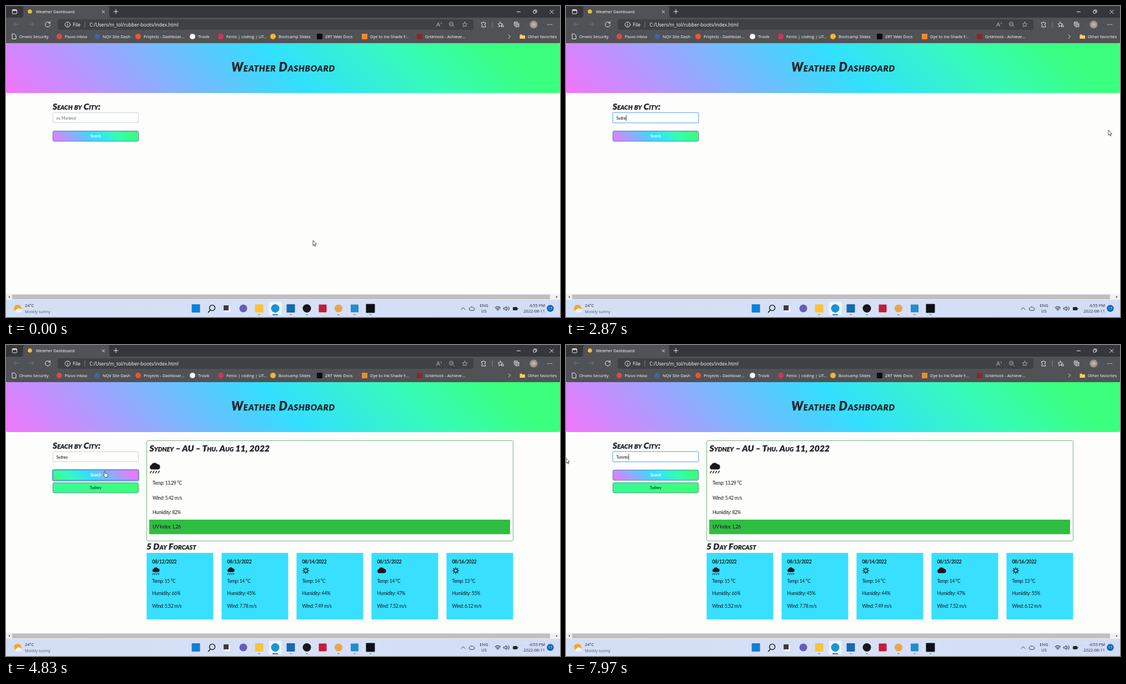
An HTML page for the animation above (8 s loop, 998 px wide and 561 px high).

```html
<!DOCTYPE html>
<html lang="en">
<head>
<meta charset="utf-8">
<title>Weather Dashboard</title>
<style>
html, body { margin: 0; width: 100%; height: 100%; overflow: hidden; background: #fdfdfb; }
svg { display: block; width: 100vw; height: 100vh; }
text { font: 7.45px "Open Sans", "Noto Sans", sans-serif; fill: #fff; white-space: pre; }
text.url { font-size: 8.55px; }
text.dark { fill: #25262c; }
text.mid { text-anchor: middle; }
text.end { text-anchor: end; }
text.head { font: italic 900 15.7px Lato, sans-serif; font-variant: small-caps; fill: #212529; stroke: #212529; stroke-width: .25; }
text.title { font-size: 21.6px; letter-spacing: .8px; text-anchor: middle; }
text.body { font: 8.5px Lato, sans-serif; letter-spacing: -.35px; fill: #14181b; }
text.small { font-size: 7.1px; }
text.bold { font-weight: 700; }
text.white { fill: #fff; }
text.hint { fill: #6c757d; }
.line { fill: none; stroke: #fff; stroke-width: .9; stroke-linecap: round; stroke-linejoin: round; }
.dim { stroke: #7b7c80; }
.soft { stroke: #b9b9c0; }
.ink { stroke: #222; }
.pointer > * { stroke-linejoin: round; }
</style>
</head>
<body>
<svg viewBox="0 0 998 561" preserveAspectRatio="none">
  <defs>
    <linearGradient id="rainbow">
      <stop offset="0" stop-color="#f375fb"/>
      <stop offset=".5" stop-color="#32dfff"/>
      <stop offset=".73" stop-color="#36fcb7"/>
      <stop offset=".89" stop-color="#3aff80"/>
      <stop offset="1" stop-color="#3cff7a"/>
    </linearGradient>
    <linearGradient id="banner" href="#rainbow" gradientUnits="userSpaceOnUse" x1="227" y1="383" x2="771" y2="-160"/>
    <linearGradient id="button" href="#rainbow" gradientUnits="userSpaceOnUse" x1="118.5" y1="278" x2="204.5" y2="192"/>
    <linearGradient id="hover" href="#rainbow" gradientUnits="userSpaceOnUse" x1="192.5" y1="192" x2="106.5" y2="278"/>
    <linearGradient id="past">
      <stop stop-color="#36fa98"/><stop offset="1" stop-color="#3cff78"/>
    </linearGradient>
    <linearGradient id="taskbar">
      <stop stop-color="#d2dff5"/><stop offset=".5" stop-color="#d6e0f7"/><stop offset="1" stop-color="#d2dcf6"/>
    </linearGradient>
    <radialGradient id="avatar">
      <stop stop-color="#c9bdb2"/><stop offset="1" stop-color="#8d8580"/>
    </radialGradient>
    <g id="cloud"><path d="M4.3 13a4.2 4.2 0 0 1-.6-8.2A5.8 5.2 0 0 1 14.4 3.600A4.8 4.8 0 0 1 15.600 13z"/></g>
    <g id="rain">
      <use href="#cloud"/>
      <path d="M3.500 15.300L1 20M8.300 15.300L5.800 20M13.100 15.300L10.600 20M17.900 15.300L15.400 20" fill="none" stroke="currentColor" stroke-width="1.5"/>
    </g>
    <g id="sun" fill="none" stroke="currentColor" stroke-width="2">
      <circle cx="10" cy="10" r="4.700"/>
      <path id="ray" d="M10 .5V4M10 16V19.500M.5 10H4M16 10H19.500"/>
      <use href="#ray" transform="rotate(45 10 10)"/>
    </g>
  </defs>

  <!-- page -->
  <rect width="998" height="561" fill="#fdfdfb"/>
  <rect y="67" width="998" height="90" rx="2" fill="url(#banner)"/>

  <!-- search form -->
  <rect id="inputGlow" x="83.200" y="191.200" width="156.600" height="20.600" rx="3" fill="#b9d6fe"/>
  <rect id="input" x="84.500" y="192.500" width="154" height="18" rx="2" fill="#fdfdfb" stroke="#ced4da"/>
  <rect id="selection" x="90.500" y="196.500" height="11" fill="#3a84ea"/>
  <text id="value" class="body small" x="90.800" y="204.700"></text>
  <path id="caret" d="M0 196.500V207.500" stroke="#222" stroke-width=".8"/>
  <rect id="buttonGlow" x="82.800" y="223.800" width="157.400" height="22.400" rx="3.500" fill="#8db4fa"/>
  <rect id="search" x="84.500" y="225.500" width="154" height="18.500" rx="2" stroke="#4377bd" stroke-width=".9"/>
  <g id="results">
    <rect x="84.500" y="248.500" width="154" height="18" rx="2" fill="url(#past)" stroke="#38a164" stroke-width=".9"/>
    <rect x="253.500" y="172.500" width="660" height="181" rx="2" fill="none" stroke="#6bab7c" stroke-width=".9"/>
    <rect x="258" y="315" width="650" height="26.300" fill="#2fbe42"/>
    <use href="#rain" transform="translate(258.500 211.500)" fill="#17191c" color="#17191c"/>
  </g>
  <g id="labels"></g>

  <!-- browser frame -->
  <rect width="998" height="67" fill="#515256"/>
  <path d="M0 0H998V21H190Q186 21 186 17V4Q186 0 182 0H35Q31 0 31 4V17Q31 21 27 21H0z" fill="#36373b"/>
  <rect x="93" y="24" width="749" height="19" rx="3" fill="#404145"/>
  <circle cx="43" cy="10" r="3.800" fill="#efc03a"/>
  <g class="line">
    <rect x="11.500" y="6.500" width="8" height="7.500" rx="1.200"/><path d="M12 8H19" stroke-width="1.500"/>
    <path d="M173.500 8.500l4 4m0-4l-4 4M194 10h8m-4-4v8M920.500 10.500h6M980 7.500l6 6m0-6l-6 6"/>
    <rect x="950" y="8.500" width="4.500" height="4.500" rx=".8"/><path d="M951.500 7h3.500q1 0 1 1v3.500"/>
    <path class="dim" d="M23 33H14m4-4l-4 4l4 4M41 33h9m-4-4l4 4l-4 4"/>
    <path d="M79 30.500a4.600 4.600 0 1 0 .8 3.500M79.500 28v3h-3"/>
    <circle cx="111" cy="33.500" r="4.600"/><path d="M111 33v3M111 31v.1"/>
    <path class="soft" d="M142 28.500V38.500M876 28.500V38.500" stroke-width=".5"/>
    <g class="soft">
      <path d="M775.500 37l3-7.500l3 7.500m-1-2.500h-4M783 30l1.500 1v1.500"/>
      <circle cx="802" cy="32.500" r="3.500"/><path d="M804.500 35l3 3M800.500 32.500h3"/>
      <path id="star" d="M826.500 29l1.300 2.800l3 .4l-2.200 2.200l.5 3l-2.600-1.500l-2.700 1.500l.6-3l-2.200-2.200l3-.4z"/>
    </g>
    <path d="M857 30h2q1-3 2.500 0h2v2.500q-3 1 0 2.800v2.500h-6.500v-2.500q2.500-1.500 0-2.800z"/>
    <use href="#star" x="64"/><path d="M893 35h3.500m-2.500 2.500h2.500"/>
    <rect x="915.500" y="29" width="6.500" height="6.500" rx="1"/><path d="M924 31.500v5q0 1-1 1h-5M917 32.300h3.500m-1.750-1.800v3.500"/>
    <path d="M976.500 33.500h.1M979.800 33.500h.1M983 33.500h.1" stroke-width="1.500"/>
    <path d="M11.500 50.500h4l2.500 2.500v6.500h-6.500zM905.500 52l3 3l-3 3"/>
  </g>
  <circle cx="950.500" cy="33.500" r="7.200" fill="url(#avatar)"/>
  <path d="M925.500 51.500h3.500l1 1.500h5v6h-9.500z" fill="#f5cf62"/>

  <!-- scrollbar and taskbar -->
  <rect y="519.500" width="998" height="10.500" fill="#f1f1f1"/>
  <rect x="11" y="520.500" width="969" height="8.500" fill="#bfbfc1"/>
  <path d="M7 522.500v4.500l-2.500-2.200zM991 522.500v4.500l2.500-2.200z" fill="#555"/>
  <rect y="530" width="998" height="31" fill="url(#taskbar)"/>
  <g transform="translate(21 545.500) scale(1.200)">
    <circle r="5.500" fill="#f7a51c"/><path d="M-2 6a2.200 2.200 0 0 1 .4-4.300a3.200 3.200 0 0 1 6-.2a2.300 2.300 0 0 1 .6 4.500z" fill="#eef3fc"/>
  </g>
  <rect x="473.500" y="533.500" width="23" height="24" rx="2.500" fill="#eef3fd"/>
  <g class="line ink">
    <circle cx="371.500" cy="544.500" r="5" stroke-width="1.500"/><path d="M368 548.500l-3.500 4" stroke-width="1.700"/>
    <path d="M820 547.500l3.500-3.500l3.500 3.500"/>
    <path d="M836 549a2.300 2.300 0 0 1 0-4.500a3.400 3.400 0 0 1 6 0a2.300 2.300 0 0 1 .5 4.500z"/>
    <path d="M881.500 544.500q4.500-4.500 9 0M883 546.500q3-3 6 0M884.500 548.300q1.500-1.500 3 0" stroke-width="1.100"/>
    <path d="M897 544.500h1.500l2.500-2.500v7.500l-2.500-2.500h-1.500zM903 543.500q1.700 2 0 4.500M905 542q3 3.700 0 7.500"/>
    <rect x="913.500" y="543.500" width="7.500" height="5" rx="1" fill="#222"/><path d="M922.300 545.500v1"/>
  </g>
  <rect x="395" y="543.500" width="9" height="9" fill="#f5f6fa"/><rect x="392" y="540" width="9" height="9" fill="#3a3b41"/>
  <circle cx="980.500" cy="545.500" r="6.200" fill="#0b66b8"/>
  <g id="icons"></g>
  <g id="chrome"></g>

  <!-- pointers, hot spot at the origin -->
  <g id="arrow" class="pointer"><path d="M0 0V9.300L2.200 7.300L3.600 10.500L5 9.900L3.600 6.800H6.500z" fill="#fff" stroke="#222" stroke-width=".8"/></g>
  <g id="hand" class="pointer"><path d="M-.9 7V1.100Q0-.3 1 1.100V4.600L4.600 5.300Q5.800 5.600 5.600 7L4.900 11.500H.6L-2.400 7.600Q-2.200 6-.9 7z" fill="#fff" stroke="#222" stroke-width=".8"/></g>
  <g id="beam" class="pointer"><path d="M-1.500-4.500H1.500M0-4.500V4.500M-1.500 4.500H1.500" fill="none" stroke="#222" stroke-width=".8"/></g>
</svg>
<script>
const byId = id => document.getElementById(id);
const make = (parent, tag, attrs, content = '') => {
  const el = document.createElementNS('http://www.w3.org/2000/svg', tag);
  for (const key in attrs) el.setAttribute(key, attrs[key]);
  el.textContent = content;
  return parent.appendChild(el);
};
const write = (parent, x, y, content, style = '') =>
  make(parent, 'text', { x, y, class: style }, content);
const mark = (x, y, size, fill, round) => make(byId('icons'), 'rect', {
  x: x - size / 2, y: y - size / 2, width: size, height: size, rx: round ? size / 2 : 1, fill
});

// Browser and taskbar text
const chrome = byId('chrome');
write(chrome, 54, 13, 'Weather Dashboard');
write(chrome, 120.5, 36.500, 'File', 'url');
write(chrome, 150.5, 36.500, 'C:/Users/m_tol/rubber-boots/index.html', 'url');
write(chrome, 940, 57.700, 'Other favorites');
[
  [24, 'Orvelo Security'],
  [106, 'Pluvo inbox', '#dc4a3d', true],
  [174, 'NQV Site Dash', '#40659f', true],
  [248, 'Projects - Dashboar...', '#f4552c', true],
  [346, 'Trovik', '#fff', true],
  [397, 'Fenlo | coding | UT...', '#d8315f', true],
  [491, 'Bootcamp Slides', '#efb72d', true],
  [575, 'ZRT Web Docs', '#090909'],
  [656, 'Dye to Ink Shade F...', '#f58a2b'],
  [755, 'Gridmoot - Achieve...', '#8e2529']
].forEach(([x, name, color, round]) => {
  write(chrome, x, 57.700, name);
  if (color) mark(x - 10, 55, 10, color, round);
});
[
  [342, 15, '#0f7fd6'], [427.5, 14, '#675cc0', true], [456, 15, '#f6c33d'],
  [485, 15, '#1b94cf', true], [513, 15, '#1769ad'], [542, 15, '#16181b', true],
  [570.5, 14, '#c51c36'], [599, 14, '#e9a44c', true], [628, 14, '#238bd2'], [656.5, 16, '#0b1014']
].forEach(([x, size, color, round]) => mark(x, 545.5, size, color, round));
[456, 513, 542, 599, 628, 656.5].forEach(x =>
  make(byId('icons'), 'rect', { x: x - 2, y: 556, width: 4, height: 1.5, rx: .7, fill: '#83878f' }));
make(byId('icons'), 'rect', { x: 480, y: 556, width: 10, height: 1.700, rx: .8, fill: '#1268b8' });
write(chrome, 34, 543.300, '24°C', 'dark');
write(chrome, 34, 553.700, 'Mostly sunny', 'dark').style.fill = '#595d66';
write(chrome, 861, 543, 'ENG', 'dark mid');
write(chrome, 861, 553.300, 'US', 'dark mid');
write(chrome, 971, 543, '4:55 PM', 'dark end');
write(chrome, 971, 553.300, '2022-08-11', 'dark end');
write(chrome, 980.5, 548, '17', 'mid').style.fontSize = '6.5px';

// Page text
const labels = byId('labels'), results = byId('results');
write(labels, 499.4, 118, 'Weather Dashboard', 'head title');
write(labels, 84, 186.500, 'Seach by City:', 'head');
write(labels, 161.5, 237.300, 'Search', 'body small bold white mid');
write(results, 161.5, 260, 'Sydney', 'body small mid');
write(results, 258.5, 191.500, 'Sydney – AU – Thu. Aug 11, 2022', 'head');
write(results, 253, 368.500, '5 Day Forcast', 'head');
['Temp: 13.29 °C', 'Wind: 5.42 m/s', 'Humidity: 82%', 'UV Index: 1.26']
  .forEach((line, i) => write(results, 264, 252.300 + i * 26.300, line, 'body'));
[
  ['rain', 15, 66, '5.52'], ['rain', 14, 45, '7.78'], ['sun', 14, 44, '7.49'],
  ['cloud', 14, 47, '7.52'], ['sun', 13, 55, '6.12']
].forEach(([icon, temp, humidity, wind], i) => {
  const x = 253.300 + i * 135.050;
  make(results, 'rect', { x, y: 375, width: 120, height: 120, fill: '#38dfff' });
  const scale = { rain: .7, sun: .66, cloud: .85 }[icon];
  make(results, 'use', {
    href: '#' + icon, fill: '#17191c', color: '#17191c',
    transform: `translate(${x + 10} 400.500) scale(${scale})`
  });
  write(results, x + 10, 394.300, `08/${12 + i}/2022`, 'body bold');
  write(results, x + 10, 428.500, `Temp: ${temp} °C`, 'body');
  write(results, x + 10, 451.200, `Humidity: ${humidity}%`, 'body');
  write(results, x + 10, 473.500, `Wind: ${wind} m/s`, 'body');
});

// Timeline: [ms, x, y]
const LOOP = 8000;
const path = [
  [0, 553, 423], [30, 553, 423], [450, 330, 300], [830, 165, 203], [930, 165, 203],
  [1160, 520, 238], [1420, 977, 224], [3150, 977, 224], [3270, 976, 223],
  [3420, 976, 223], [3500, 974, 259], [3800, 974, 259], [4350, 178, 227], [5000, 178, 227],
  [5330, 165, 218], [5470, 165, 218], [5780, 122, 202], [5900, 122, 202], [6250, 0, 201],
  [7130, 0, 201], [7400, 0, 204], [LOOP, 0, 204]
];
const sydneyKeys = [1730, 2170, 2420, 2670, 2870, 3100];
const torontoKeys = [6470, 6720, 6960, 7200, 7450, 7700, 7930];
const caretTimes = [[930, 1400], [1730, 3800], [4200, 4650], [5830, 5930], [6470, LOOP]];

const between = (t, a, b) => t >= a && t < b;
const typed = (word, keys, t) => word.slice(0, keys.filter(k => k <= t).length);
const show = (id, on) => byId(id).style.display = on ? '' : 'none';

function pointerAt(t) {
  const i = path.findIndex(p => p[0] > t);
  const [t0, x0, y0] = path[i - 1], [t1, x1, y1] = path[i];
  const u = (t - t0) / (t1 - t0), k = u * u * (3 - 2 * u);
  return [x0 + (x1 - x0) * k, y0 + (y1 - y0) * k];
}

function draw(t) {
  const [x, y] = pointerAt(t);
  const column = x > 84 && x < 239;
  const overSearch = column && y > 225 && y < 244;
  const overInput = column && y > 192 && y < 211;
  const kind = overSearch ? 'hand' : overInput ? 'beam' : 'arrow';
  ['arrow', 'hand', 'beam'].forEach(id => show(id, id === kind));
  byId(kind).setAttribute('transform', `translate(${x} ${y})`);

  const inputFocus = between(t, 930, 4650) || t >= 5830;
  show('inputGlow', inputFocus);
  byId('input').setAttribute('stroke', inputFocus ? '#86b7fe' : '#ced4da');
  show('buttonGlow', between(t, 4650, 5830));
  byId('search').setAttribute('fill', overSearch ? 'url(#hover)' : 'url(#button)');
  show('results', t >= 4800);

  const value = t < 6470 ? typed('Sydney', sydneyKeys, t) : typed('Toronto', torontoKeys, t);
  const field = byId('value');
  field.textContent = value || 'ex. Montreal';
  const end = 90.8 + (value ? field.getComputedTextLength() : 0);
  const left = Math.max(90.5, Math.min(end, x));
  const selecting = between(t, 5930, 6470) && left < end;
  show('selection', selecting);
  byId('selection').setAttribute('x', left);
  byId('selection').setAttribute('width', Math.max(0, end - left));
  field.setAttribute('class', 'body small ' + (!value ? 'hint' : selecting && left < 96 ? 'white' : ''));
  show('caret', caretTimes.some(([a, b]) => between(t, a, b)));
  byId('caret').setAttribute('transform', `translate(${end + .4} 0)`);
}

let start;
function tick(now) {
  start ??= now;
  draw((now - start) % LOOP);
  requestAnimationFrame(tick);
}
draw(0);
requestAnimationFrame(tick);
</script>
</body>
</html>
```
